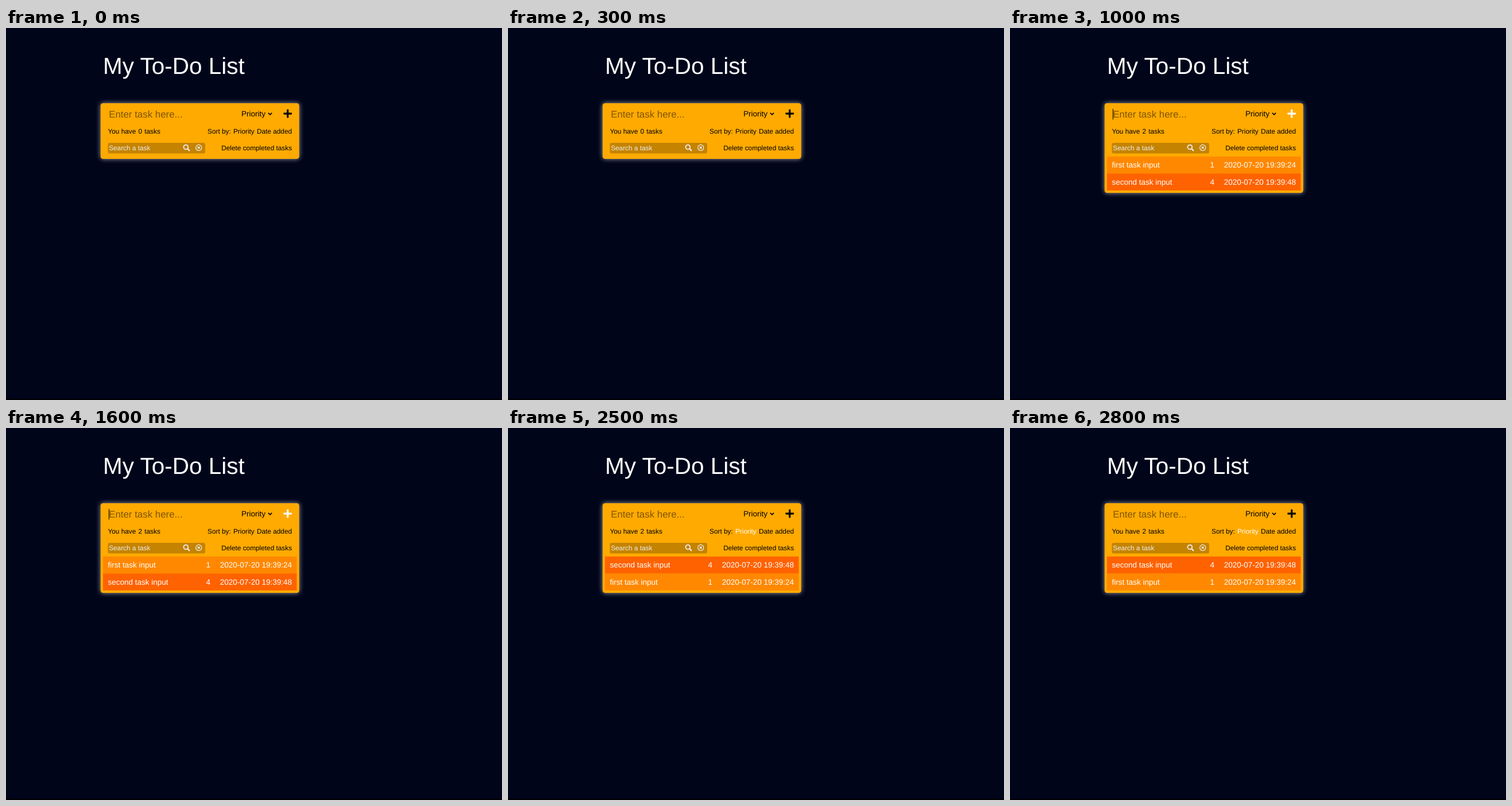
Animation of 864x648 px, one loop 3000 ms. Source, as an HTML page:

```html
<!DOCTYPE html>
<html lang="en">
<head>
<meta charset="utf-8">
<title>My To-Do List</title>
<style>
  html, body { margin: 0; width: 100%; height: 100%; overflow: hidden; background: #00051a; }
  svg { display: block; width: 100vw; height: 100vh; font: 16px Arial, "Liberation Sans", sans-serif; text-rendering: geometricPrecision; }
  .small { font-size: 14px; }
  .end { text-anchor: end; }
  #card { fill: #fa0; filter: drop-shadow(0 0 5px rgba(255, 255, 255, .6)); }
  .task text { fill: #fff; }
  .icon { fill: none; stroke: #eee; }
</style>
</head>
<body>
<svg viewBox="0 0 1024 768">
  <rect y="765.6" width="1024" height="2.4"/>
  <text x="200.3" y="94.8" font-size="48" fill="#fff">My To-Do List</text>
  <rect id="card" x="195.3" y="155.3" width="410" height="115" rx="5"/>

  <text x="212.3" y="184.3" font-size="20" fill-opacity=".5">Enter task here...</text>
  <rect id="caret" x="212" y="167" width="1.2" height="22"/>
  <text x="486" y="182.8">Priority</text>
  <path d="M541.5 175.3l3.7 3.7 3.7-3.7" fill="none" stroke="#000" stroke-width="2"/>
  <g id="plus">
    <rect x="572.8" y="174.8" width="17.5" height="3.75" rx="1.25"/>
    <rect x="579.7" y="167.9" width="3.75" height="17.5" rx="1.25"/>
  </g>

  <g class="small">
    <text x="210.3" y="217.8">You have <tspan id="count" dx="1.1">0</tspan> <tspan dx="1.1">tasks</tspan></text>
    <text class="end" x="590.3" y="217.8">Sort by: <tspan id="sort" dx="1.1">Priority</tspan> <tspan dx="1.1">Date added</tspan></text>
    <rect x="210.3" y="237" width="201" height="22" rx="4" fill-opacity=".23"/>
    <text x="212.3" y="252.8" fill="#eee">Search a task</text>
    <g class="icon">
      <circle cx="371.4" cy="245.9" r="4.6" stroke-width="2.1"/>
      <path d="M375 249.5l3.4 3.4" stroke-width="2.7" stroke-linecap="round"/>
      <circle cx="397.9" cy="247" r="6" stroke-width="1.4"/>
      <path d="M395.6 244.7l4.6 4.6m0-4.6l-4.6 4.6" stroke-width="1.7"/>
    </g>
    <text class="end" x="590.3" y="252.8">Delete completed tasks</text>
  </g>

  <g class="task">
    <rect x="200.3" width="400" height="35" fill="#ff8800"/>
    <text x="210.3" y="23">first task input</text>
    <text class="end" x="421.8" y="23">1</text>
    <text class="end" x="590.3" y="23">2020-07-20 19:39:24</text>
  </g>
  <g class="task">
    <rect x="200.3" width="400" height="35" fill="#ff6200"/>
    <text x="210.3" y="23">second task input</text>
    <text class="end" x="421.8" y="23">4</text>
    <text class="end" x="590.3" y="23">2020-07-20 19:39:48</text>
  </g>
</svg>
<script>
const LOOP = 3000, ROW = 35, LIST_TOP = 265.3;
const $ = id => document.getElementById(id);
const tasks = [...document.querySelectorAll('.task')];

// order lists the task indexes from top to bottom
const steps = [
  { at: 0, order: [] },
  { at: 500, order: [0], caret: true, hover: true },
  { at: 1000, order: [0, 1], caret: true, hover: true },
  { at: 2000, order: [0, 1], hover: true },
  { at: 2500, order: [1, 0], sorted: true }
];

function show({ order, caret, hover, sorted }) {
  $('card').setAttribute('height', 115 + ROW * order.length);
  $('count').textContent = order.length;
  $('caret').style.display = caret ? '' : 'none';
  $('plus').setAttribute('fill', hover ? '#fff' : '#000');
  $('sort').setAttribute('fill', sorted ? '#fff' : '#000');
  tasks.forEach((task, i) => {
    const place = order.indexOf(i);
    task.style.display = place < 0 ? 'none' : '';
    task.setAttribute('transform', `translate(0 ${LIST_TOP + ROW * place})`);
  });
}

let current;
function tick() {
  const t = performance.now() % LOOP;
  const step = steps.findLast(s => s.at <= t);
  if (step !== current) show(current = step);
  requestAnimationFrame(tick);
}
tick();
</script>
</body>
</html>
```
